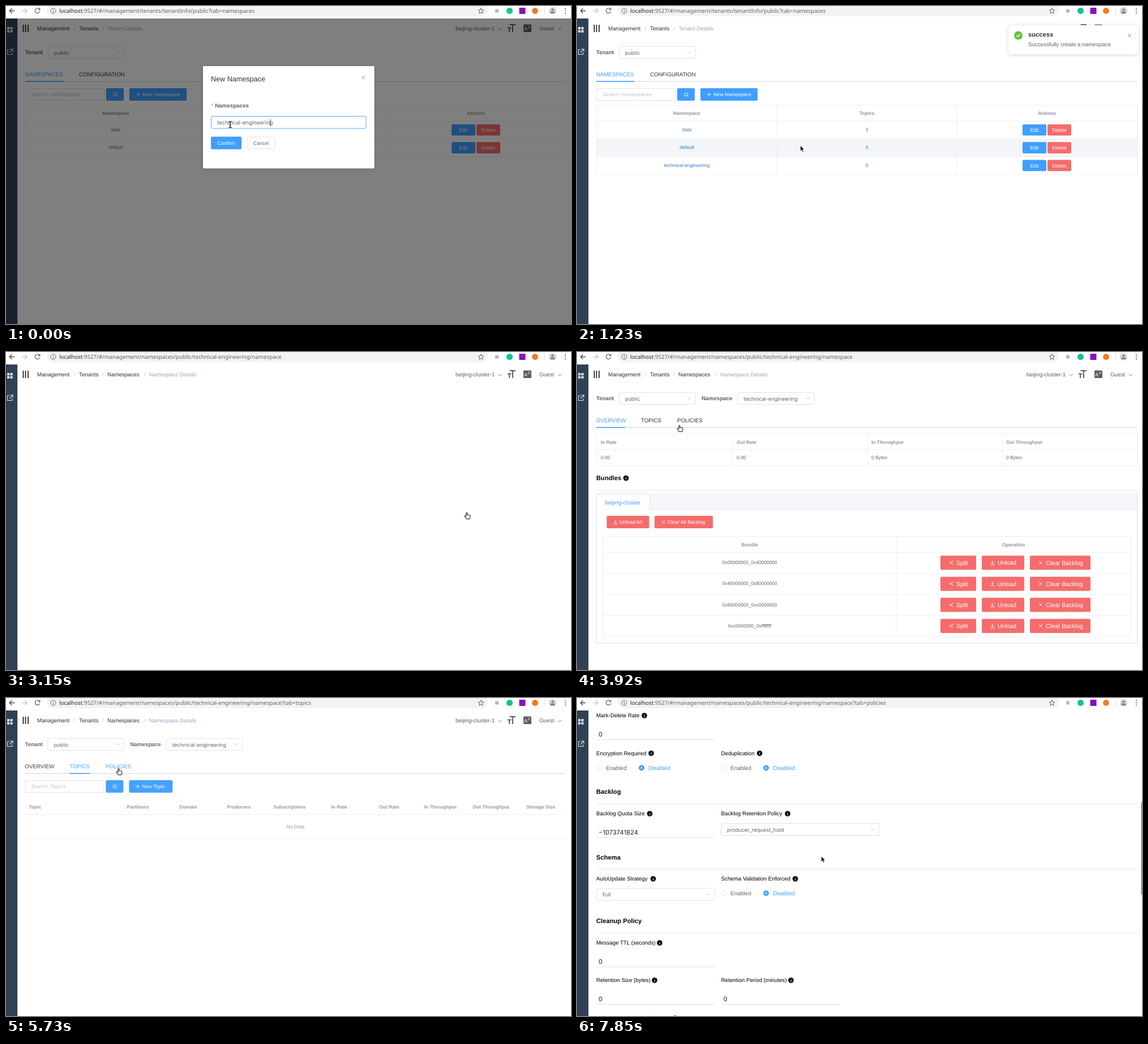
Animation of 998 by 561 pixels, one loop 8 s. Source, as an HTML page:

```html
<!DOCTYPE html>
<html lang="en">
<head>
<meta charset="utf-8">
<title>Namespace management</title>
<style>
html, body { margin: 0; width: 100%; height: 100%; overflow: hidden; background: #fff; }
svg { display: block; width: 998px; height: 561px; font-family: "Liberation Sans", Arial, sans-serif; }
text { white-space: pre; text-rendering: geometricPrecision; }
.url { font-family: "Noto Sans", sans-serif; }
.input { font-family: Inter, sans-serif; }
</style>
</head>
<body>
<svg id="stage" viewBox="0 0 998 561"></svg>
<script>
const LOOP = 8000;
const TICKS = [0, 150, 300, 450, 600, 750, 930, 1080, 1230, 1520, 1670, 1820, 1970, 2120, 2260, 2410,
  2700, 2850, 3000, 3150, 3620, 3770, 3920, 4070, 4220, 4520, 4670, 4820, 4970, 5120, 5280, 5430,
  5580, 5730, 6030, 6180, 6330, 6480, 6930, 7070, 7220, 7370, 7550, 7700, 7850];
// Page changes: when the old page leaves and when the new one enters
const NAV = [{ out: 2675, in: 3435 }, { out: 4490, in: 5345 }, { out: 6005, in: 6800 }];
const BLUE = '#409eff', RED = '#f56c6c', LINE = '#ebeef5', EDGE = '#dcdfe6';
const INK = '#303133', GREY = '#606266', SOFT = '#909399', PALE = '#c0c4cc';
const BOLD = 'font-weight="700"', MID = 'text-anchor="middle"', BOLD_MID = BOLD + ' ' + MID, INPUT = 'class="input"';
const ICON = {
  plus: 'M-3.3 0H3.3M0-3.3V3.3',
  close: 'M-2.8-2.8L2.8 2.8M2.8-2.8L-2.8 2.8',
  load: 'M0-3.5V1.4M-2.2-.7L0 1.5 2.2-.7M-3.5 3.5H3.5',
  share: 'M3-2.6L-2.6 0 3 2.6M2.4-2.6h1.4M-3.2 0h1.4M2.4 2.6h1.4',
  find: 'M2.6 0A2.9 2.9 0 1 1-3.2 0 2.9 2.9 0 1 1 2.6 0M1.8 2.1L3.4 3.6',
  down: 'M-3.4-1.7L0 1.7 3.4-1.7',
  check: 'M-3.3.1L-1 2.4 3.4-2.2'
};

const clamp = v => Math.min(1, Math.max(0, v));
const mix = (a, b, p) => a + (b - a) * p;

// cubic-bezier(.25, .1, .25, 1)
function ease(v) {
  v = clamp(v);
  let lo = 0, hi = 1;
  for (let i = 0; i < 20; i++) {
    const s = (lo + hi) / 2, r = 1 - s;
    if (.75 * s * r * r + .75 * s * s * r + s * s * s < v) lo = s; else hi = s;
  }
  const s = lo, r = 1 - s;
  return .3 * s * r * r + 3 * s * s * r + s * s * s;
}

const text = (x, y, s, size = 9.8, fill = INK, more = '') =>
  `<text x="${x}" y="${y + size * .355}" font-size="${size}" fill="${fill}" ${more}>${s}</text>`;
const rect = (x, y, w, h, fill, more = '') =>
  `<rect x="${x}" y="${y}" width="${w}" height="${h}" fill="${fill}" ${more}/>`;
const box = (x, y, w, h, stroke = EDGE, r = 2.5) =>
  rect(x + .5, y + .5, w - 1, h - 1, '#fff', `stroke="${stroke}" stroke-width=".9" rx="${r}"`);
const path = (d, stroke, w = 1, more = '') =>
  `<path d="${d}" fill="none" stroke="${stroke}" stroke-width="${w}" ${more}/>`;
const hr = (y, x1 = 34, x2 = 989, c = '#e4e6ea') => path(`M${x1} ${y}H${x2}`, c, .9);
const dot = (x, y, r, fill, more = '') => `<circle cx="${x}" cy="${y}" r="${r}" fill="${fill}" ${more}/>`;
const icon = (name, x, y, c, w = .9) => path(ICON[name], c, w, `transform="translate(${x} ${y})"`);
const group = (x, y, op, body) => `<g transform="translate(${x} ${y})" opacity="${op}">${body}</g>`;
const info = (x, y) => dot(x, y, 4.8, '#000') +
  text(x, y, 'i', 8, '#fff', BOLD_MID + ' font-style="italic" font-family="Liberation Serif, serif"');

function button(x, y, w, h, fill, label, mark, size = 8.8) {
  const big = h > 24;
  return rect(x, y, w, h, fill, 'rx="2.2"') + (mark
    ? icon(mark, x + (big ? 19 : 15.5), y + h / 2, '#fff') + text(x + (big ? 28 : 23), y + h / 2, label, size, '#fff')
    : text(x + w / 2, y + h / 2, label, size, '#fff', MID));
}
const plainButton = (x, y, w, label) => box(x, y, w, 22) + text(x + w / 2, y + 11, label, 8.8, GREY, MID);
const select = (x, y, w, label, c = GREY) =>
  box(x, y, w, 22) + text(x + 11, y + 11.3, label, 9.2, c, INPUT) + icon('down', x + w - 12, y + 11, PALE);
const search = (hint, w, label) => box(34, 145, 140, 22) + text(45, 156, hint, 9.1, PALE, INPUT) +
  rect(177, 145, 31, 22, BLUE, 'rx="2.2"') + icon('find', 193, 156, '#fff') +
  button(218, 145, w, 22, BLUE, label, 'plus');

function tabs(list, active, p, cur) {
  const [, bx, bw] = list[active];
  return path('M34 133.3H989', '#dcdfe6', 1.4) + rect(34 + (bx - 34) * p, 132.4, bw, 1.6, BLUE) +
    list.map(([s, x, w], i) => {
      const over = cur.y < 132 && cur.y > 108 && cur.x > x - 3 && cur.x < x + w + 3;
      return text(x, 120.5, s, 9.7, i === active || over ? BLUE : INK);
    }).join('');
}

function browser(t) {
  const base = '/#/management/';
  const ns = base + 'namespaces/public/technical-engineering/namespace';
  const rest = t < 2700 ? base + 'tenants/tenantInfo/public?tab=namespaces'
    : ns + (t < 4520 ? '' : t < 6030 ? '?tab=topics' : '?tab=policies');
  const dark = '#5f6368';
  return rect(0, 0, 998, 22, '#fff') + rect(72, -6, 779, 24, '#f1f3f4', 'rx="12"') +
    path('M15 8.5H6.5M10.5 4.3L6.3 8.5 10.5 12.7', '#45484c', 1.3) +
    path('M28.5 8.5H37M33 4.3L37.2 8.5 33 12.7', '#c4c7ca', 1.3) +
    path('M59 5.4A4.3 4.3 0 1 0 59.7 9.6M59.8 3.4V6.6H56.6', dark, 1.3) +
    path('M88 8.5A4.5 4.5 0 1 1 79 8.5 4.5 4.5 0 1 1 88 8.5M83.5 7.8V11M83.5 6V7', dark, 1) +
    text(94, 8.5, `<tspan fill="#202124">localhost</tspan>:9527${rest}`, 9.75, dark, 'class="url"') +
    path('M839 3.6L840.4 7 844 7.3 841.2 9.6 842.1 13.2 839 11.2 835.9 13.2 836.8 9.6 834 7.3 837.6 7Z', dark, 1) +
    rect(864, 5.5, 6, 6, '#b5b8bb') + dot(889.5, 8.5, 5.6, '#15c39a') +
    rect(906.5, 3, 11, 11, '#8b0fc0') + dot(934.5, 8.5, 5.4, '#f47a1f') + path('M951.5 2V15', '#d5d7da', .8) +
    dot(965.5, 8.5, 6.6, '#d3d6da') + dot(965.5, 6.5, 2.1, '#80868b') +
    rect(961.5, 9.5, 8, 3.6, '#80868b', 'rx="1.8"') + [4.5, 8.5, 12.5].map(y => dot(988, y, 1.1, dark)).join('');
}

const sidebar = () => rect(0, 22, 20.2, 539, '#304156') +
  [2, 7.5].map(x => [37, 42.5].map(y => rect(x, y, 4.2, 4.2, '#dbe3ec', 'rx=".5"')).join('')).join('') +
  path('M6 77H2.5V85.5H11V82M7.5 76H12V80.5M12 76L6 82', '#dbe3ec', 1.1);

function navbar(t) {
  const p = ease((t - NAV[0].out) / 500);
  const slash = x => text(x, 39.5, '/', 9.8, PALE, MID);
  const c = '#5a5e66', last = '#97a8be';
  let s = [30.5, 34.5, 39].map(x => rect(x - .8, 33, 1.6, 13, '#111')).join('') +
    text(55, 39.5, 'Management') + slash(121) + text(129, 39.5, 'Tenants') + slash(171);
  if (p < 1) s += group(14 * p, 0, 1 - p, text(179.5, 39.5, 'Tenant Details', 9.7, last) + (p ? slash(250) : ''));
  if (p > 0) s += group(14 * (1 - p), 0, p,
    text(179, 39.5, 'Namespaces', 9.7) + slash(245) + text(253, 39.5, 'Namespace Details', 9.6, last));
  return s + text(794, 40, 'beijing-cluster-1', 9.8, c) + icon('down', 872.5, 40.5, c, .8) +
    path('M889.5 33H900M895 33V46M886 38.5H892.5M889.2 38.5V46', c, 2) +
    rect(914, 32.5, 14, 13.5, c, 'rx="1.5"') + text(915.2, 40, 'A', 8.5, '#fff') +
    text(921, 37, '文', 5.5, '#fff', 'font-family="Noto Sans CJK SC, Noto Sans CJK, sans-serif"') +
    text(942, 40, 'Guest', 9.8, c) + icon('down', 978, 40.5, c, .8);
}

const tenantBar = () => text(34, 82, 'Tenant', 9.8, GREY, BOLD) + select(74, 71, 136, 'public');
const nsBar = () => tenantBar() + text(220, 82, 'Namespace', 9.8, GREY, BOLD) +
  select(283.5, 71, 136, 'technical-engineering');

function tenantPage(t, cur) {
  const rows = [['data', 3], ['default', 0], ['technical-engineering', 0]]
    .slice(0, t < 750 ? 2 : t < 930 ? 0 : 3);
  const end = rows.length ? 203 + rows.length * 31.4 : 245;
  const cols = rows.length ? end : 203;
  let s = tenantBar() + tabs([['NAMESPACES', 34, 67], ['CONFIGURATION', 129, 80]], 0, 1, { x: 0, y: 0 }) +
    search('Search namespaces', 101, 'New Namespace');
  rows.forEach(([name, n], i) => {
    const y = 203 + i * 31.4, m = y + 15;
    const over = t >= 930 && cur.y > y && cur.y <= y + 31.4;
    const onEdit = over && cur.x > 787 && cur.x < 829;
    if (over) s += rect(34, y, 955, 31.4, '#f3f5f9');
    s += text(194, m, name, 8.5, '#337ab7', MID) + text(512, m, n, 8.5, '#337ab7', MID) +
      button(787, y + 5.7, 42, 19.8, onEdit ? '#66b1ff' : BLUE, 'Edit') +
      button(831, y + 5.7, 42, 19.8, RED, 'Delete') + hr(y, 34, 989, LINE);
  });
  if (!rows.length) s += text(512, 224, 'No Data', 8.6, SOFT, MID) + hr(203, 34, 989, LINE);
  ['Namespace', 'Topics', 'Actions'].forEach((h, i) => s += text(194 + 318 * i, 189, h, 8.6, SOFT, BOLD_MID));
  return s + path(`M34.5 175H989.5V${end}H34.5ZM671.5 175V${cols}M353.5 175V${cols}`, LINE, .9);
}

function overview() {
  let s = path('M34.5 144.5H989.5V200.5H34.5ZM34.5 172.5H989.5M275 144.5V200.5M513 144.5V200.5M751.5 144.5V200.5', LINE, .9);
  [['In Rate', '0.00', 42], ['Out Rate', '0.00', 282], ['In Throughput', '0 Bytes', 520], ['Out Throughput', '0 Bytes', 758]]
    .forEach(([h, v, x]) => s += text(x, 159, h, 8.4, SOFT, BOLD) + text(x, 186.3, v, 8.4, GREY));
  s += text(34, 222.5, 'Bundles', 11.2, '#000', BOLD) + info(86.5, 222.5) + hr(244) +
    box(34, 250, 956, 264, EDGE, 0) + rect(128, 250.5, 861, 27.5, '#f5f7fa') +
    path('M128 250V278H989.5', '#e1e4ea', .9) + text(49, 265, 'beijing-cluster', 10.2, BLUE) +
    button(52.5, 289, 75, 22, RED, 'Unload All', 'load') + button(137, 289, 103, 22, RED, 'Clear All Backlog', 'close') +
    path('M45.5 325.5H978.5V502H45.5ZM564 325.5V502', LINE, .9) +
    text(305, 339.5, 'Bundle', 8.6, SOFT, BOLD_MID) + text(771, 339.5, 'Operation', 8.6, SOFT, BOLD_MID);
  ['0x00000000_0x40000000', '0x40000000_0x80000000', '0x80000000_0xc0000000', '0xc0000000_0xffffffff'].forEach((b, i) => {
    const y = 353.3 + i * 37.15;
    s += hr(y, 45.5, 978.5, LINE) + text(305, y + 18, b, 8.4, GREY, MID) +
      button(642, y + 6, 63, 25, RED, 'Split', 'share', 10.6) +
      button(715, y + 6, 75, 25, RED, 'Unload', 'load', 10.4) +
      button(800, y + 6, 107, 25, RED, 'Clear Backlog', 'close', 10.6);
  });
  return s;
}

function topics() {
  const heads = [['Topic', 41], ['Partitions', 214], ['Domain', 307], ['Producers', 391], ['Subscriptions', 473],
    ['In Rate', 575], ['Out Rate', 660], ['In Throughput', 739], ['Out Throughput', 825], ['Storage Size', 920]];
  return search('Search Topics', 77, 'New Topic') + heads.map(([h, x]) => text(x, 192, h, 8.5, SOFT, BOLD)).join('') +
    hr(205.5, 34, 989, LINE) + text(512, 227, 'No Data', 8.6, SOFT, MID) + hr(247.5, 34, 989, LINE);
}

function policies(t) {
  const head = (y, s) => text(34, y, s, 11.2, '#000', BOLD) + hr(y + 21.3);
  const sub = (y, s, ix) => text(34, y, s, 11.2, INK) + (ix ? info(ix, y) : '');
  const label = (x, y, s, ix) => text(x, y, s, 9.75, '#000') + info(ix, y);
  const field = (x, y, v) => text(x + 4, y, v, 11.2, '#222', INPUT) + hr(y + 9.3, x, x + 210, EDGE);
  const radios = (x, y) => dot(x + 5.5, y + .3, 4.6, '#fff', `stroke="${EDGE}" stroke-width=".8"`) +
    text(x + 17, y, 'Enabled', 10, GREY) + dot(x + 80, y + .3, 4.9, BLUE) + dot(x + 80, y + .3, 1.5, '#fff') +
    text(x + 92, y, 'Disabled', 10, BLUE);
  const top = head(166, 'Clusters') + sub(200, 'Replicated Clusters', 141) + select(34, 220, 350, 'Please select clusters', PALE) +
    head(264, 'Authorization') + info(115, 264) + plainButton(34, 307, 59, 'Add Role') +
    head(351, 'Subscription Authentication') + sub(385, 'Subscription Authentication Mode', 214) +
    select(34, 405, 210, 'Please select Authentication', PALE) +
    head(449, 'Storage') + sub(482, 'Replication Factor', 134.5) +
    ['Ensembel Size', 'Write Quorum Size', 'Ack Quorum Size'].map((s, i) =>
      text(34 + 220.3 * i, 499.5, s, 9.8, INK) + field(34 + 220.3 * i, 532.5, t < 7070 ? '' : '0')).join('');
  const more = label(34, 31, 'Mark-Delete Rate', 119) + field(34, 64, '0') +
    label(34, 97.5, 'Encryption Required', 131) + label(254.5, 97.5, 'Deduplication', 322.5) +
    radios(34, 123) + radios(254, 123) +
    head(165, 'Backlog') + label(34, 204, 'Backlog Quota Size', 128.5) + field(34, 237, '−1073741824') +
    label(254.5, 204, 'Backlog Retention Policy', 372) + select(254, 221, 280, 'producer_request_hold') +
    head(281, 'Schema') + label(34, 319, 'AutoUpdate Strategy', 134.5) + select(34, 335.5, 210, 'Full') +
    label(254.5, 319, 'Schema Validation Enforced', 385.5) + radios(254, 344) +
    head(393, 'Cleanup Policy') + label(34, 432, 'Message TTL (seconds)', 146) + field(34, 465, '0') +
    label(34, 498, 'Retention Size (bytes)', 137) + field(34, 531.3, '0') +
    label(254.5, 498, 'Retention Period (minutes)', 378) + field(254.5, 531.3, '0') +
    label(34, 565, 'Compaction Threshold (bytes)', 173);
  return top + group(0, 535, 1, more);
}

function dialog(t) {
  const p = ease((t - 702) / 300), shade = ease((t - 704) / 200);
  if (p === 1) return '';
  const focus = t < 450;
  return rect(0, 22, 998, 539, '#000', `opacity="${.5 * (1 - shade)}"`) + group(0, -14 * p, 1 - p,
    rect(348, 106, 302.5, 180.5, '#fff', 'rx="1.4" filter="url(#shade)"') + text(362, 128.5, 'New Namespace', 12.6) +
    icon('close', 631, 126.3, SOFT, 1) + text(362, 176, '*', 9.8, RED) + text(369, 176, 'Namespaces', 9.8, GREY, BOLD) +
    box(362, 194, 274.5, 22.5, focus ? BLUE : '#8cc5ff') + text(373, 205.5, 'technical-engineering', 9.5, GREY, INPUT) +
    (focus ? rect(466.2, 200, .9, 11.5, '#222') : '') +
    button(362, 230.5, 54, 22.3, focus ? BLUE : '#66b1ff', 'Confirm', '', 9) + plainButton(425.5, 230.5, 50, 'Cancel'));
}

function toast(t) {
  const start = 712;
  if (t < start || t > 2975) return '';
  return group(236 * (1 - ease((t - start) / 300)), 0, 1 - ease((t - 2660) / 300),
    rect(762, 34, 230, 51.5, '#fff', `rx="5.6" stroke="${LINE}" stroke-width=".7" filter="url(#shade)"`) +
    dot(779.5, 52, 7.5, '#67c23a') + icon('check', 779.5, 52, '#fff', 1.5) +
    text(797, 50.3, 'success', 11.2, INK, BOLD) + text(797, 67.5, 'Successfully create a namespace', 9.8, GREY) +
    icon('close', 976, 52, SOFT, 1));
}

function progress(t) {
  return NAV.map(n => {
    const d = t - n.out;
    if (d < 0 || d > 475) return '';
    return rect(0, 21.6, 998 * clamp(.49 + d * .0021), 1.6, BLUE, `opacity="${clamp((475 - d) / 200)}"`);
  }).join('');
}

// time, x, y, shape used from then on
const TRAIL = [[0, 396, 209, 'beam'], [150, 396, 211, 'beam'], [450, 397, 250, 'hand'], [750, 397, 252, 'hand'],
  [1080, 397, 252, 'arrow'], [1370, 397, 252, 'arrow'], [1820, 540, 285, 'arrow'], [2120, 715, 303, 'arrow'],
  [2410, 814, 288, 'hand'], [3470, 814, 288, 'arrow'], [3620, 560, 205, 'arrow'], [3920, 181, 134, 'hand'],
  [4220, 132, 127, 'hand'], [5120, 132, 127, 'hand'], [5730, 199, 129, 'hand'], [6030, 199, 129, 'hand'],
  [6180, 250, 160, 'arrow'], [6480, 434, 285, 'arrow'], [LOOP, 434, 285, 'arrow']];

function pointer(t) {
  const i = TRAIL.findIndex(k => k[0] > t), a = TRAIL[i - 1], b = TRAIL[i];
  const p = (t - a[0]) / (b[0] - a[0]);
  return { x: mix(a[1], b[1], p), y: mix(a[2], b[2], p), shape: a[3] };
}

function drawPointer({ x, y, shape }) {
  const at = `transform="translate(${x} ${y})" stroke-linejoin="round"`;
  if (shape === 'beam') return path('M-2.6-5.5Q0-5.5 0-4Q0-5.5 2.6-5.5M0-4V4M-2.6 5.5Q0 5.5 0 4Q0 5.5 2.6 5.5M-1.3 1.5H1.3', '#000', 1.1, at);
  if (shape === 'hand') return `<path ${at} fill="#fff" stroke="#000" stroke-width="1" d="M-1 6.6L-4 1.8c-.6-1 .8-1.7 1.5-.8l1.3 1.4V-3.8c0-1.4 1.9-1.4 1.9 0V-.4c.2-1 1.8-.9 1.8.2.3-.9 1.7-.7 1.7.3.4-.7 1.6-.4 1.6.5V3.2L4.7 6.6z"/>`;
  return `<path ${at} fill="#000" stroke="#fff" stroke-width=".8" d="M-2.5-6V4.2L-.2 2 1.4 5.7 3.1 5 1.5 1.4H4.6z"/>`;
}

function pages(t, cur) {
  const list = [['OVERVIEW', 34, 51], ['TOPICS', 113, 36], ['POLICIES', 177, 45]];
  const active = t >= NAV[2].out ? 2 : t >= NAV[1].out ? 1 : 0;
  const body = [() => tenantPage(t, cur), overview, topics, () => policies(t)];
  return body.map((draw, i) => {
    const from = i ? NAV[i - 1].in : -LOOP, to = NAV[i] ? NAV[i].out : LOOP;
    if (t < from || t > to + 500) return '';
    const a = ease((t - from) / 500), b = ease((t - to) / 500);
    const slide = ease((t - (t > to ? to : from - 60)) / 300);
    const top = i ? nsBar() + tabs(list, active, slide, cur) : '';
    return group(21 * (a - 1 + b), 0, a * (1 - b), top + draw());
  }).join('');
}

const DEFS = `<defs><clipPath id="view"><rect x="20" y="22" width="978" height="539"/></clipPath>
<filter id="shade" x="-10%" y="-20%" width="120%" height="150%"><feDropShadow dx="0" dy="1" stdDeviation="3" flood-opacity=".16"/></filter></defs>`;

function scene(t) {
  const cur = pointer(t), q = clamp((t - 7220) / 630);
  const scroll = 535 * q * q * (3 - 2 * q);
  return DEFS + `<g clip-path="url(#view)">${group(0, -scroll, 1, navbar(t) + pages(t, cur))}</g>` +
    sidebar() + (scroll > 0 ? rect(997, 22 + scroll * .302, 1, 163, '#4a4a4a') : '') +
    progress(t) + dialog(t) + toast(t) + browser(t) + drawPointer(cur);
}

const stage = document.getElementById('stage');
let shown = -1;
function loop() {
  const now = performance.now() % LOOP;
  const t = TICKS.filter(k => k <= now).pop();
  if (t !== shown) stage.innerHTML = scene(shown = t);
  requestAnimationFrame(loop);
}
loop();
</script>
</body>
</html>
```
